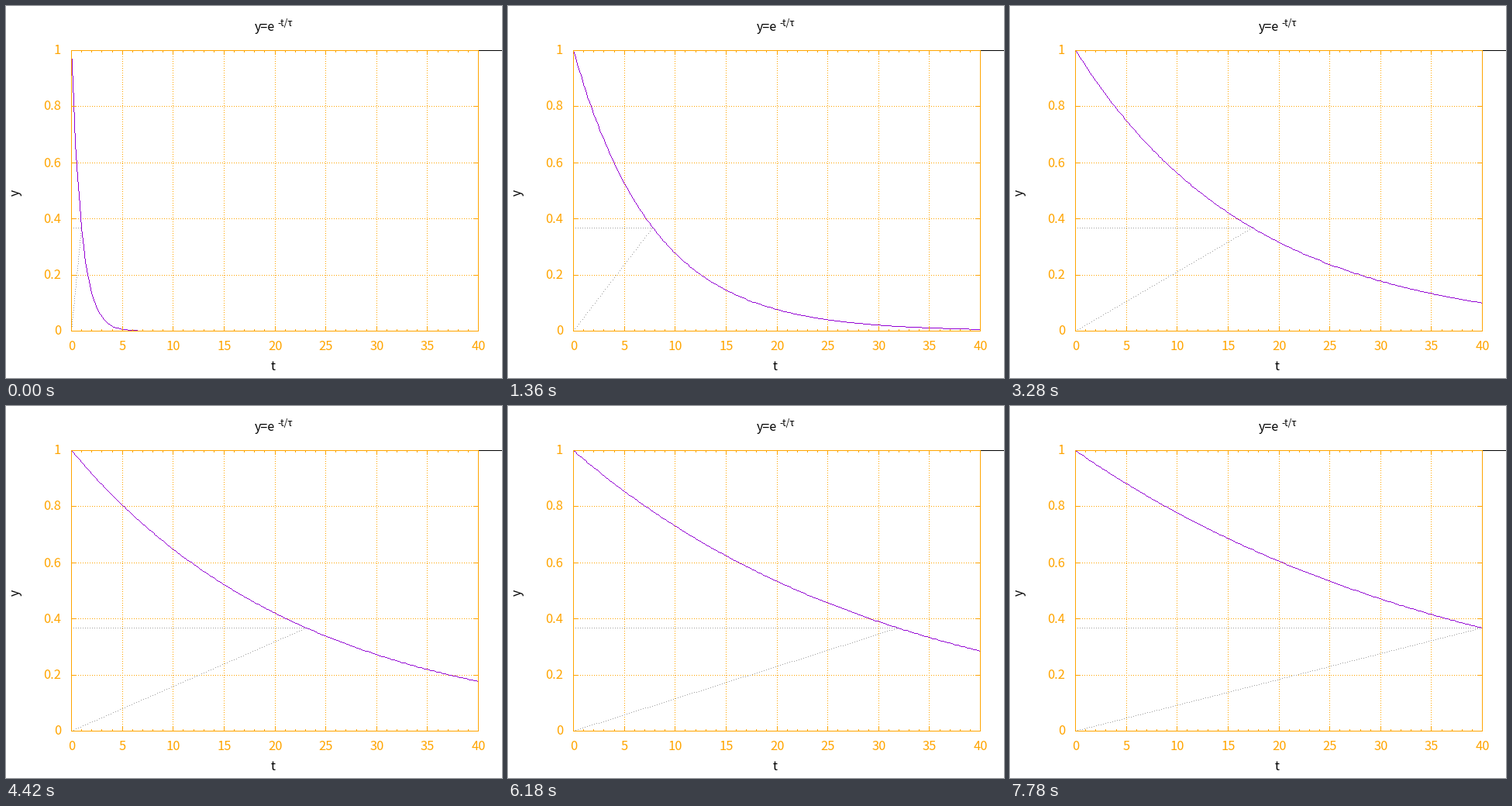
A matplotlib script for the animation above (7800 ms loop, 640 by 480 pixels).

```python
import numpy as np
import matplotlib.pyplot as plt
from matplotlib.animation import FuncAnimation

W, H = 640, 480
L, R, T, B = 84, 609, 57, 419
T_MAX = 40
FRAMES, STEP_MS = 390, 20
ORANGE, GRAY, VIOLET = "#ffa500", "#a0a0a0", "#9400d3"
FONT = "Noto Sans CJK JP"

plt.rcParams["path.simplify"] = False
fig = plt.figure(figsize=(W / 72, H / 72), dpi=72, facecolor="white")
ax = fig.add_axes([0, 0, 1, 1])
ax.set_xlim(-0.5, W - 0.5)
ax.set_ylim(H - 0.5, -0.5)
ax.axis("off")


def px(t):
    return np.floor(L + (R - L) * np.asarray(t) / T_MAX + 0.5)


def py(y):
    return np.floor(B - (B - T) * np.asarray(y) + 0.5)


def trace(xs, ys, dots=False):
    """Pixels of a one-pixel polyline; dots keep every third one."""
    parts = []
    for x0, y0, x1, y1 in zip(xs[:-1], ys[:-1], xs[1:], ys[1:]):
        n = int(max(abs(x1 - x0), abs(y1 - y0)))
        s = np.arange(n + 1)[:, None] / max(n, 1)
        parts.append(np.array([x0, y0]) + s * np.array([x1 - x0, y1 - y0]))
    pts = np.floor(np.concatenate(parts) + 0.5)
    return pts[::3] if dots else pts


def squares(pts):
    """Broken path with one unit dash per pixel."""
    x, y = pts.T
    gap = np.full_like(x, np.nan)
    return (np.column_stack([x - 0.5, x + 0.5, gap]).ravel(),
            np.column_stack([y, y, gap]).ravel())


def layer(color, z, traces=()):
    data = squares(np.concatenate(traces)) if traces else ([], [])
    return ax.plot(*data, color=color, lw=1, zorder=z, snap=False,
                   solid_capstyle="butt")[0]


def label(x, y, s, color="black", size=16, ha="center", **kw):
    ax.text(x, y, s, color=color, fontsize=size, family=FONT, ha=ha,
            va="baseline", **kw)


grid = []
frame = [trace([L, R, R, L, L], [T, T, B, B, T])]

for t in range(T_MAX + 1):
    x = px(t)
    major = t % 5 == 0
    size = 5 if major else 2
    frame += [trace([x, x], [T, T + size]), trace([x, x], [B, B - size])]
    if major:
        label(x, 443, str(t), ORANGE, 16.5)
        grid.append(trace([x, x], [B, T], True))

for k in range(6):
    y = py(k / 5)
    frame += [trace([L, L + 5], [y, y]), trace([R, R - 5], [y, y])]
    label(70.5, y + 5, f"{k / 5:g}", ORANGE, 16.5, "right")
    grid.append(trace([L, R], [y, y], True))

layer(ORANGE, 1, grid)
layer(ORANGE, 4, frame)
layer("black", 4, [trace([R + 1, W - 1], [T, T])])

label(320, 32, "y=e", ha="left")
label(350, 26, "-t/τ", size=12, ha="left")
label(344, 470, "t")
ax.text(20, 240, "y", fontsize=16, family=FONT, rotation=90,
        ha="right", va="center")

ts = np.linspace(0, T_MAX, 200)
guides = layer(GRAY, 2)
curve = layer(VIOLET, 3)


def draw(i):
    tau = 1 + i / 10
    x, y = px(tau), py(np.exp(-1))
    guides.set_data(*squares(np.concatenate([
        trace([L, x], [y, y], True), trace([L, x], [B, y], True)])))
    curve.set_data(*squares(trace(px(ts), py(np.exp(-ts / tau)))))
    return guides, curve


anim = FuncAnimation(fig, draw, frames=FRAMES, interval=STEP_MS,
                     repeat=True, repeat_delay=0, blit=False)
plt.show()
```
